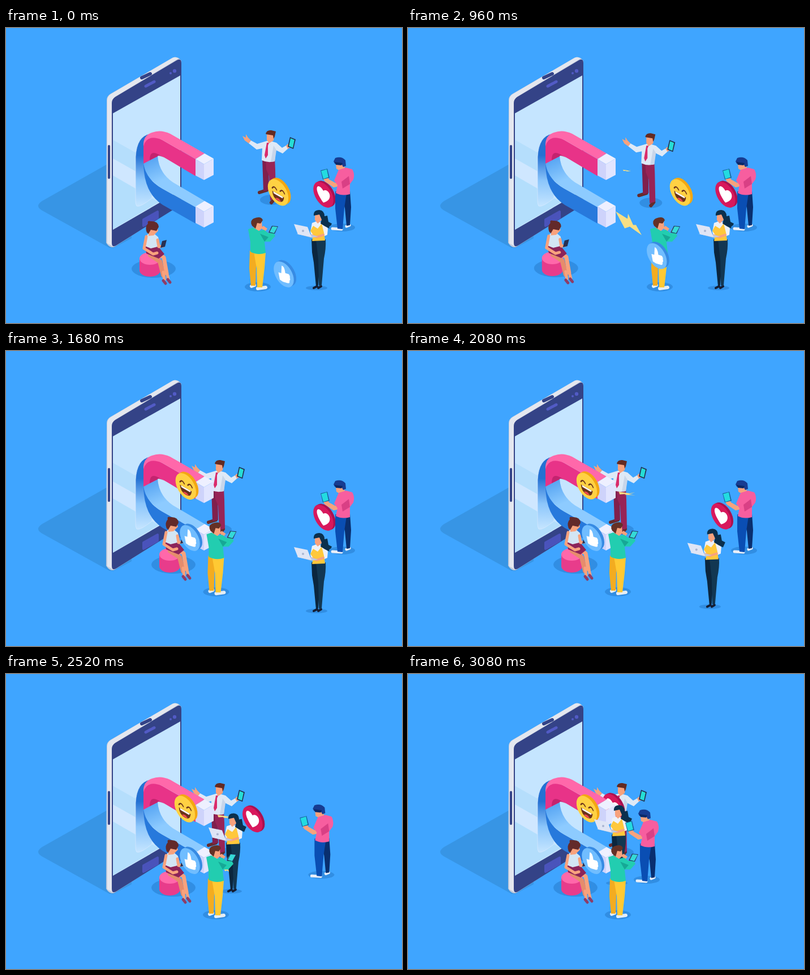
An HTML page that plays this animation: 700x522 px, repeating every 8000 ms.

```html
<!DOCTYPE html>
<html lang="en">
<head>
<meta charset="utf-8">
<title>Phone magnet</title>
<style>
html, body { margin: 0; width: 100%; height: 100%; overflow: hidden; background: #3fa5ff }
svg { display: block; width: 100vw; height: 100vh }
.shade { fill: #318ee3 }
.skin { fill: #f8a27d }
.line { fill: none; stroke-linecap: round; stroke-linejoin: round }
</style>
</head>
<body>
<svg viewBox="0 0 700 522">
  <defs>
    <linearGradient id="slot" x1="0" y1="0" x2="0" y2="1">
      <stop offset=".3" stop-color="#2471d3"/>
      <stop offset=".65" stop-color="#8cc6fb"/>
      <stop offset="1" stop-color="#c5e5ff"/>
    </linearGradient>
    <linearGradient id="bend" x1="0" y1="0" x2=".5" y2="1">
      <stop offset="0" stop-color="#4a9cf0"/>
      <stop offset=".5" stop-color="#8dcbff"/>
    </linearGradient>
  </defs>
  <path fill="#3795e5" d="M179 241 64 306Q50 315 64 323L183 389 190 389 222 372V262Z"/>

  <g id="phone">
    <path fill="#c3cbdc" d="M178 128Q178 121 184 117L294 53Q299 50 305 53L310 58V311L192 387Q186 390 180 384L177 380Z"/>
    <path fill="#e4e7ef" d="M179 128Q179 121 185 117L294 53Q299 50 305 54L194 121Q188 125 188 132V386L179 381Z"/>
    <path fill="#344387" d="M187 133Q187 126 193 122L302 57Q310 53 310 62V308Q310 312 306 315L196 384Q187 390 187 380Z"/>
    <path fill="#c5e5ff" d="M189 151 308 84V288L189 357Z"/>
    <path fill="#b5defc" d="M189 198 244 229V262L189 231Z"/>
    <path fill="#cfe7ff" d="M189 231 244 262V292L189 261Z"/>
    <path fill="#b3defc" d="M189 261 270 308 189 356Z"/>
    <path class="line" stroke="#344387" stroke-width="4" d="M182 209V265"/>
    <path class="line" stroke="#344387" stroke-width="6" d="M240 88 255 81"/>
    <path class="line" stroke="#525bc5" stroke-width="5" d="M247 103 262 95"/>
    <circle cx="291" cy="80" r="2" fill="#525bc5"/>
    <circle cx="298" cy="76" r="3.2" fill="#525bc5"/>
    <path fill="#4a53bb" stroke="#4a53bb" stroke-width="4" stroke-linejoin="round" d="M243 339 268 325V336L243 350Z"/>
    <path fill="url(#slot)" stroke="#d9eaff" stroke-width=".7" d="M229 228Q231 191 255 187L262 190 258 301Q237 318 231 315 229 313 229 305Z"/>
  </g>

  <g id="host">
    <ellipse class="shade" cx="469" cy="304" rx="20" ry="9"/>
    <path class="line" stroke="#662b2c" stroke-width="6" d="M448 291 461 287M469 309 474 303"/>
    <path fill="#80204d" d="M453 230H464L465 287 455 289Z"/>
    <path fill="#982456" d="M459 230H475L476 251 477 302 467 305 465 262 460 250Z"/>
    <path fill="#dfe9f6" d="M454 202 464 199 478 203 488 212 495 208 499 213 489 222 477 216 475 236Q462 239 452 234L453 213 443 215 429 204 433 199 444 205Z"/>
    <path fill="#c8d6ea" d="M473 208 478 216 475 236 468 237Z"/>
    <path fill="#da2c6b" d="M461 203 465 203 463 208 463 225 459 231 457 225Z"/>
    <path class="skin" d="M433 199 429 204 422 199 418 191 424 194 424 188 428 194ZM495 208 498 205 502 211 498 214ZM461 187Q468 182 474 188L473 199 465 204 461 198Z"/>
    <path fill="#632a22" d="M459 187Q461 180 469 181L477 183 475 192 473 196 472 190Q466 189 460 188Z"/>
    <path fill="#202b4c" d="M502 193 512 197 508 214 498 210Z"/>
    <path fill="#26ddd5" d="M503 195 510 198 507 212 500 209Z"/>
  </g>

  <g id="heart">
    <g transform="matrix(.866 .5 0 1 561 295)">
      <g fill="#ab1150"><circle r="20.5" cx="4.5" cy="-4"/><circle r="20.5" cx="2" cy="-2"/></g>
      <circle r="20.5" fill="#d8185c"/>
      <path fill="#fff" d="M0 14C-24-3-10-18 0-7 10-18 24-3 0 14Z"/>
    </g>
  </g>

  <g id="magnet">
    <path fill="#2779dc" d="M243 237Q246 267 276 284L335 317V346L277 313Q243 292 243 237Z"/>
    <path fill="url(#bend)" d="M268 226Q270 256 295 273L351 306 335 317 276 284Q246 266 243 238Z"/>
    <path fill="#e83388" d="M243 240V207Q246 195 258 194L266 193 276 198 335 232V262L283 231Q268 222 268 227Z"/>
    <path fill="#c4236f" d="M254 234Q254 216 268 223L279 229Q268 224 268 227Z"/>
    <path fill="#ff68aa" d="M243 209Q242 190 258 185 273 179 290 187L351 222 335 232 276 198Q249 187 243 209Z"/>
    <g id="tip">
      <path fill="#eef0ff" d="M335 232 351 222 367 231 350 241Z"/>
      <path fill="#ced3fb" d="M335 232 350 241V269L335 261Z"/>
      <path fill="#e1e5ff" d="M350 241 367 231V260L350 269Z"/>
    </g>
    <use href="#tip" y="84"/>
  </g>

  <g fill="#f8df84">
    <path id="boltLow" d="M-23-21-2-8-1-17 8 3 13 3 23 21 2 6-7 9Z"/>
    <path id="boltHigh" d="M-25-6 8-1 23-4 5 2 24 5-8 3-4 1-22 2Z"/>
  </g>

  <g id="sitter">
    <ellipse class="shade" cx="261" cy="426" rx="39" ry="16"/>
    <path fill="#e83c8b" d="M236 407V429A18.500 11 0 0 0 273 429V407Z"/>
    <ellipse fill="#ff68aa" cx="254.500" cy="408" rx="18.500" ry="11"/>
    <path class="line" stroke="#e68c6c" stroke-width="8" d="M255 402 272 413 278 437"/>
    <path class="line" stroke="#f8a27d" stroke-width="7" d="M261 396 279 406 284 434"/>
    <path class="line" stroke="#f8a27d" stroke-width="5" d="M278 432 280 445M284 432 287 444"/>
    <path class="line" stroke="#8e3d67" stroke-width="5" d="M278 447 282 452M286 445 290 450"/>
    <path fill="#8c2459" d="M246 385 267 384 280 400 270 408 248 399Z"/>
    <path fill="#d3e5f4" d="M250 365 262 364 269 370 272 386 256 390 246 386Z"/>
    <path class="line" stroke="#f8a27d" stroke-width="5" d="M248 369 244 390 260 400 267 398M268 375 270 387 277 386"/>
    <path class="skin" d="M252 353 266 350 269 359 261 367 252 368Z"/>
    <path fill="#632a2a" d="M249 362Q245 352 251 346 249 340 256 342 269 341 270 352L266 359 256 357 252 364Z"/>
    <path fill="#283052" d="M276 377 284 375 281 387 273 389Z"/>
  </g>

  <g id="smiley">
    <g transform="matrix(.866 .5 0 1 481 291)">
      <g fill="#f3a712"><circle r="21" cx="5" cy="-5"/><circle r="21" cx="2" cy="-2"/></g>
      <circle r="21" fill="#ffd143"/>
      <path class="line" stroke="#6b321b" stroke-width="2.200" d="M-12-2Q-8-9-3-3M4-4Q9-11 13-4"/>
      <path fill="#6b321b" d="M-12 3H12Q11 15 0 15T-12 3Z"/>
      <path fill="#fff" d="M-10 3H10L9 6H-9Z"/>
      <path fill="#f3484f" d="M-6 13Q0 8 6 13 0 16-6 13Z"/>
    </g>
  </g>

  <g id="worker">
    <ellipse class="shade" cx="549" cy="460" rx="19" ry="4"/>
    <path fill="#0b263e" d="M540 374 558 372 555 409 552 455 548 457 544 415 541 397Z"/>
    <path fill="#123752" d="M548 374 565 374Q566 390 562 408L558 455 553 456 552 410Z"/>
    <path class="line" stroke="#141e34" stroke-width="4" d="M544 460 550 457M552 460 557 457"/>
    <path fill="#eef1f8" d="M541 345 549 342 563 345 569 355 568 366 561 369 541 371 538 361Z"/>
    <path fill="#ffc83b" d="M543 350 551 355 558 346 562 362 564 376 541 377 543 366 538 359Z"/>
    <path class="skin" d="M546 329 557 329 558 340 551 346 546 340Z"/>
    <path fill="#0b304d" d="M544 332Q543 322 554 322 563 323 563 333L568 332 570 343 576 346 572 355 564 351 556 346 558 339 554 330Z"/>
    <path class="line" stroke="#f8a27d" stroke-width="4" d="M561 366 549 370 541 367"/>
    <path fill="#bfcbdf" d="M513 364 540 371 552 369 537 365Z"/>
    <path fill="#dfe5f5" d="M509 347 533 352 540 370 516 365Z"/>
    <circle cx="525" cy="359" r="2" fill="#aab5d1"/>
  </g>

  <g id="teal">
    <ellipse class="shade" cx="445" cy="458" rx="23" ry="8"/>
    <path class="line" stroke="#e4edf5" stroke-width="6" d="M434 457 439 455M445 461 459 459"/>
    <path fill="#f3ac20" d="M431 394 446 396 442 424 441 456 433 456 430 425Z"/>
    <path fill="#ffc933" d="M438 396 459 397 457 424 453 459 444 459 443 425Z"/>
    <path class="skin" d="M439 343 452 342 453 354 445 361 438 357ZM451 354 455 350 462 355 458 360ZM464 362 467 355 473 358 474 362Z"/>
    <path fill="#22cdb0" d="M428 356 437 353 447 359 456 357 464 363 473 362 476 368 467 378 457 378 459 398Q445 403 432 396L432 379Z"/>
    <path fill="#16a896" d="M449 364 464 370 457 378Z"/>
    <path fill="#653126" d="M435 350Q430 341 438 337 451 332 454 340L450 346 444 345 441 355Z"/>
    <path fill="#23355b" d="M470 350 481 351 475 364 464 362Z"/>
    <path fill="#35d9d7" d="M471 351 480 352 474 363 466 361Z"/>
  </g>

  <g id="like">
    <g transform="matrix(.866 .5 0 1 491 436)">
      <g fill="#378be3"><circle r="20.500" cx="5" cy="-5"/><circle r="20.500" cx="2" cy="-2"/></g>
      <circle r="20.500" fill="#70bdff"/>
      <path fill="#fff" transform="rotate(-14)" d="M-11-1H-5L-1-14Q5-15 4-3H11Q14-1 12 3 13 6 10 8 10 13 5 13H-5L-11 11Z"/>
    </g>
  </g>

  <g id="capman">
    <ellipse class="shade" cx="594" cy="353" rx="23" ry="7"/>
    <path class="line" stroke="#e8eff9" stroke-width="5" d="M577 355 593 356M602 351 607 349"/>
    <path fill="#092f6f" d="M592 290 608 288 610 317 608 349 602 350 599 319Z"/>
    <path fill="#0a4eb3" d="M582 289 602 292 598 319 595 356 586 355 582 319Z"/>
    <path class="skin" d="M583 240 598 241 599 249 591 253 584 249ZM592 268 582 274 571 268 567 260 560 266 564 272 579 282 594 279Z"/>
    <path fill="#f75e9f" d="M588 251 601 247 612 250Q617 258 614 268L608 276 608 294Q594 298 583 292L586 278 580 270Z"/>
    <path fill="#d94085" d="M593 272 606 262 608 276 595 284Z"/>
    <path fill="#173c91" d="M579 236 582 230Q593 226 600 234L601 244 596 246 594 242 581 240Z"/>
    <path fill="#0a2868" d="M581 237 595 239 593 243 583 242Z"/>
    <path fill="#175f9a" d="M556 252 568 249 572 265 560 268Z"/>
    <path fill="#23dbe0" d="M557 253 567 250 570 264 561 267Z"/>
  </g>
</svg>
<script>
const LOOP = 8000, STEP = 40;
const el = id => document.getElementById(id);

// id: [start ms, duration ms, dx, dy]
const moves = {
  host: [590, 800, -90, 12],
  like: [615, 920, -166, -105],
  sitter: [900, 640, 35, -48],
  smiley: [1120, 600, -165, -52],
  teal: [1300, 400, -74, -32],
  worker: [1930, 800, -180, -90],
  heart: [1960, 960, -199, -60],
  capman: [2300, 720, -172, 11]
};

// id: [centre x, centre y, [time, scale] keys]
const bolts = {
  boltLow: [390, 345.5, [[280, 0], [960, 1], [1320, .77], [1600, 0], [2400, 0], [2680, .9], [3080, 0]]],
  boltHigh: [387.5, 252.5, [[280, 0], [620, 1], [960, .3], [1200, 0], [1720, 0], [2320, 1], [2760, 0]]]
};

const ease = p => (1 - Math.cos(Math.PI * Math.min(1, Math.max(0, p)))) / 2;

function scaleAt(keys, t) {
  const i = keys.findIndex(k => k[0] > t);
  if (i < 1) return 0;
  const [a, from] = keys[i - 1], [b, to] = keys[i];
  return from + (to - from) * (t - a) / (b - a);
}

function draw() {
  const t = Math.floor(performance.now() % LOOP / STEP) * STEP;
  for (const id in moves) {
    const [start, span, dx, dy] = moves[id];
    const k = ease((t - start) / span);
    el(id).setAttribute("transform", `translate(${dx * k} ${dy * k})`);
  }
  for (const id in bolts) {
    const [x, y, keys] = bolts[id];
    el(id).setAttribute("transform", `translate(${x} ${y}) scale(${scaleAt(keys, t)})`);
  }
  requestAnimationFrame(draw);
}
draw();
</script>
</body>
</html>
```
